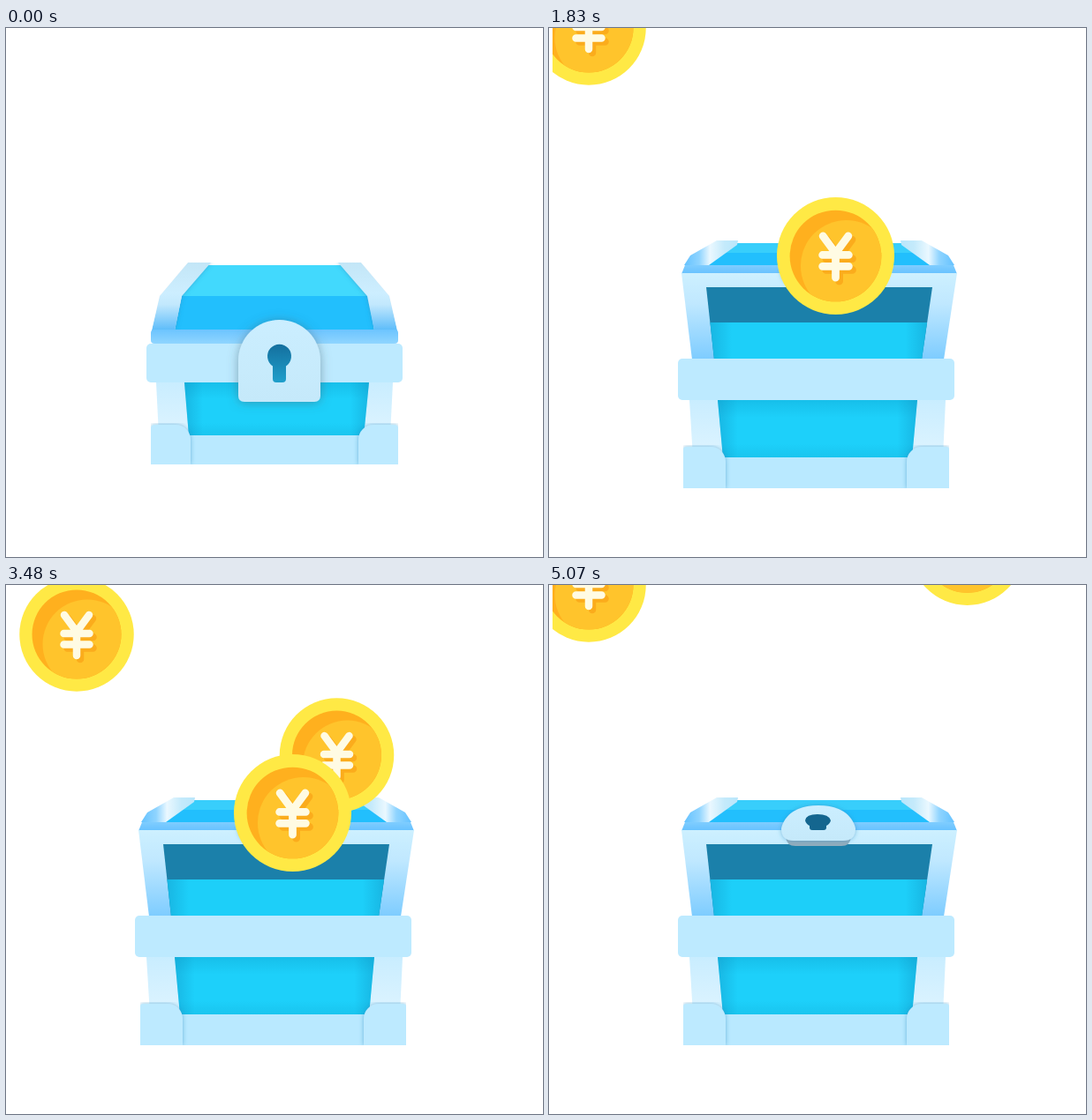
An HTML page for the animation above (5.1 s loop, 608 by 600 pixels).

```html
<!DOCTYPE html>
<html lang="en">
<head>
<meta charset="utf-8">
<title>Treasure chest</title>
<style>
  html, body { margin: 0; width: 100%; height: 100%; overflow: hidden; background: #fff; }
  svg { display: block; width: 608px; height: 600px; }
</style>
</head>
<body>
<svg viewBox="0 0 608 600">
  <defs>
    <linearGradient id="strap" x1="0" y1="0" x2="0" y2="1">
      <stop offset="0" stop-color="#c3e6f7"/>
      <stop offset=".45" stop-color="#cdeeff"/>
      <stop offset=".62" stop-color="#c2e8fd"/>
      <stop offset="1" stop-color="#5cbcfa"/>
    </linearGradient>
    <linearGradient id="rimShut" x1="0" y1="0" x2="0" y2="1">
      <stop offset="0" stop-color="#6cc4ff"/>
      <stop offset="1" stop-color="#8fd5ff"/>
    </linearGradient>
    <linearGradient id="rimOpen" x1="0" y1="0" x2="0" y2="1">
      <stop offset="0" stop-color="#7fcdff"/>
      <stop offset="1" stop-color="#66c1ff"/>
    </linearGradient>
    <linearGradient id="corner">
      <stop offset="0" stop-color="#64c2ff"/>
      <stop offset=".28" stop-color="#8fd4ff"/>
      <stop offset=".48" stop-color="#eaf8ff"/>
      <stop offset=".75" stop-color="#c4eafb"/>
      <stop offset="1" stop-color="#b9e6fb"/>
    </linearGradient>
    <linearGradient id="frame" x1="0" y1="0" x2="0" y2="1">
      <stop offset="0" stop-color="#cdf0ff"/>
      <stop offset=".35" stop-color="#c0e8ff"/>
      <stop offset="1" stop-color="#7dccff"/>
    </linearGradient>
    <linearGradient id="leg" x1="0" y1="0" x2="0" y2="1">
      <stop offset="0" stop-color="#c9edff"/>
      <stop offset="1" stop-color="#def4ff"/>
    </linearGradient>
    <linearGradient id="plate" x1="0" y1="0" x2="0" y2="1">
      <stop offset="0" stop-color="#cbeeff"/>
      <stop offset="1" stop-color="#c5e9fa"/>
    </linearGradient>
    <linearGradient id="hole" x1="0" y1="0" x2="0" y2="1">
      <stop offset="0" stop-color="#146f9e"/>
      <stop offset="1" stop-color="#1f9fcb"/>
    </linearGradient>
    <linearGradient id="body" x1="0" y1="0" x2="0" y2="1">
      <stop offset="0" stop-color="#17bfea"/>
      <stop offset=".3" stop-color="#1dd0fa"/>
      <stop offset=".75" stop-color="#1dd0fa"/>
      <stop offset="1" stop-color="#19c4ee"/>
    </linearGradient>
    <linearGradient id="sides">
      <stop offset="0" stop-color="#1090c0" stop-opacity=".4"/>
      <stop offset=".1" stop-color="#1090c0" stop-opacity="0"/>
      <stop offset=".9" stop-color="#1090c0" stop-opacity="0"/>
      <stop offset="1" stop-color="#1090c0" stop-opacity=".4"/>
    </linearGradient>
    <filter id="soft" x="-30%" y="-30%" width="160%" height="160%">
      <feDropShadow dx="0" dy="1" stdDeviation="6" flood-color="#41606e" flood-opacity=".5"/>
    </filter>
    <filter id="edge" x="-20%" y="-20%" width="140%" height="140%">
      <feDropShadow dx="0" dy="0" stdDeviation="2.500" flood-color="#2a8fc4" flood-opacity=".6"/>
    </filter>
    <clipPath id="face"><circle r="50.5"/></clipPath>
    <clipPath id="stage"><rect x="4" width="600" height="600"/></clipPath>
    <clipPath id="lidShape"><path d="M206 266H402L434 304 443 343H165L174 304Z"/></clipPath>
    <clipPath id="feetShut"><path d="M164 448H444V495H164Z"/></clipPath>
    <clipPath id="feetOpen"><path d="M152 473H453V522H152Z"/></clipPath>
    <path id="yen" d="M-14-22 0-3 14-22M0-3V24M-14.500-1h29M-14.500 11.500h29"
      fill="none" stroke-width="8.500" stroke-linecap="round" stroke-linejoin="round"/>
    <g id="coin">
      <circle r="64.750" fill="#ffe945"/>
      <circle r="50.500" fill="#ffb01e"/>
      <circle cx="12" cy="11" r="50.500" fill="#ffc42c" clip-path="url(#face)"/>
      <use href="#yen" x="4" y="4" stroke="#fbac1c"/>
      <use href="#yen" stroke="#fffbe3"/>
    </g>

    <path id="strapShut" d="M206 266H232L199 304 191 343H165L174 304Z" fill="url(#strap)"/>
    <path id="footShut" d="M164 454q0-4 4-4H192a17 17 0 0 1 17 17V495H164Z" fill="#bdeaff"/>
    <path id="cornerOpen" d="M190 241H214L213 246 181 269H153L160 258Z" fill="url(#corner)"/>
    <path id="footOpen" d="M152 478q0-3 3-3H183a17 17 0 0 1 17 17V522H152Z" fill="#bdeaff"/>
    <path id="bodyShut" d="M202 402H411L405 463H207Z"/>
    <path id="bodyOpen" d="M191 422H417L411 488H197Z"/>
    <path id="inside" d="M182.500 334H428L422 376H187Z"/>
  </defs>

  <g clip-path="url(#stage)">
    <g id="shut">
      <path d="M228 269H380L410 304 417 343H191L199 304Z" fill="#22bffd"/>
      <path d="M228 269H380L410 304H199Z" fill="#42d9fd"/>
      <g clip-path="url(#lidShape)">
        <g filter="url(#edge)">
          <use href="#strapShut"/>
          <use href="#strapShut" transform="matrix(-1 0 0 1 608 0)"/>
        </g>
      </g>
      <rect x="164" y="342" width="280" height="16" rx="4" fill="url(#rimShut)"/>
      <path d="M170 402H438L435 462H173Z" fill="url(#leg)"/>
      <use href="#bodyShut" fill="url(#body)"/>
      <use href="#bodyShut" fill="url(#sides)"/>
      <rect x="166" y="462" width="276" height="33" fill="#b9e9ff"/>
      <g clip-path="url(#feetShut)">
        <g filter="url(#edge)">
          <use href="#footShut"/>
          <use href="#footShut" transform="matrix(-1 0 0 1 608 0)"/>
        </g>
      </g>
      <rect x="159" y="358" width="290" height="44" rx="5" fill="#bdeaff"/>
      <path d="M263 377.500a46.500 46.500 0 0 1 93 0V417q0 7-7 7H270q-7 0-7-7Z" fill="url(#plate)" filter="url(#soft)"/>
      <path d="M302 383.500a13.500 13.500 0 1 1 15 0V398q0 4-4 4h-7q-4 0-4-4Z" fill="url(#hole)"/>
    </g>

    <g id="open">
      <path d="M205 244H408L440 270H172Z" fill="#22bffd"/>
      <path d="M210 244H403L414 255H196Z" fill="#38cefb"/>
      <use href="#cornerOpen"/>
      <use href="#cornerOpen" transform="matrix(-1 0 0 1 612 0)"/>
      <path d="M154 269H458L462 279H150Z" fill="url(#rimOpen)"/>
      <path d="M150 278H462L447 376H162Z" fill="url(#frame)"/>
      <path d="M178 294H434L422 376H187Z" fill="#1b80aa"/>
      <use href="#inside" fill="#1dcff9"/>
      <use href="#inside" fill="url(#sides)"/>
      <path d="M268 286H342Q341 296 331 296H279Q269 296 268 286Z" fill="#93adbd"/>
      <path d="M263 276C267 260 281 250 305 250S343 260 347 276Q347 290 333 290H277Q263 290 263 276Z" fill="url(#plate)" filter="url(#edge)"/>
      <path d="M290 267Q291 260 304 260T319 267Q318 271 314 273V275Q314 278 311 278H298Q295 278 295 275V273Q291 271 290 267Z" fill="#14668f"/>
      <path d="M159 422H449L446 487H163Z" fill="url(#leg)"/>
      <use href="#bodyOpen" fill="url(#body)"/>
      <use href="#bodyOpen" fill="url(#sides)"/>
      <rect x="154" y="487" width="297" height="35" fill="#b9e9ff"/>
      <g clip-path="url(#feetOpen)">
        <g filter="url(#edge)">
          <use href="#footOpen"/>
          <use href="#footOpen" transform="matrix(-1 0 0 1 605 0)"/>
        </g>
      </g>
      <rect x="146" y="375" width="313" height="47" rx="5" fill="#bdeaff"/>
    </g>
    <g id="coins"></g>
  </g>
</svg>
<script>
const LOOP = 5100, STEP = 30;
const SHRINK_END = 18, OPEN_AT = 21;
const shut = document.getElementById('shut');
const open = document.getElementById('open');
const layer = document.getElementById('coins');

// Places along the curved flight to the left, one per step
const leftPath = [[319, 300], [279, 273], [236, 242], [192, 207],
  [151, 163], [115, 111], [80, 56], [45, 0]];

// Each flight lists its launch steps and its pose k steps after a launch
const flights = [
  {
    life: 7,
    starts: [23, 33, 43, 53, 63, 74, 84, 94, 104, 114, 123, 132, 142, 153, 163],
    pose: k => ({ x: 325 + 24.75 * k, y: 310.5 - 58.7 * k, size: 1, turn: 0 })
  },
  {
    life: 8,
    starts: [28, 38, 46, 54, 64, 74, 84, 93, 102, 110, 119, 128, 138, 146, 154, 162],
    pose: k => ({ x: leftPath[k][0], y: leftPath[k][1], size: k ? 1 : 1.027, turn: 0 })
  },
  {
    life: 6,
    starts: [24, 34, 44, 53, 61, 71, 81, 91, 100, 108, 116, 125, 138, 147, 156],
    pose: k => ({ x: 324.5 - 28.9 * k, y: 258.5 - 58.2 * k, size: 1.027, turn: -11 * k })
  }
];

for (const flight of flights) {
  flight.coin = document.createElementNS('http://www.w3.org/2000/svg', 'use');
  flight.coin.setAttribute('href', '#coin');
  layer.append(flight.coin);
}

function show(node, on) {
  node.setAttribute('visibility', on ? 'visible' : 'hidden');
}

function drawChest(step) {
  const isOpen = step >= OPEN_AT;
  show(shut, !isOpen);
  show(open, isOpen);
  const grow = Math.max(0, (step - SHRINK_END) / (OPEN_AT - SHRINK_END));
  const small = 1 - 0.08 * Math.min(1, step / SHRINK_END);
  const scale = small + (1.077 - small) * grow;
  shut.setAttribute('transform',
    `translate(304 ${380 + 18 * grow}) scale(${scale}) translate(-304 -380)`);
}

function drawCoin({ coin, starts, life, pose }, step) {
  const start = starts.find(s => step >= s && step < s + life);
  show(coin, start !== undefined);
  if (start === undefined) return;
  const { x, y, size, turn } = pose(step - start);
  coin.setAttribute('transform', `translate(${x} ${y}) rotate(${turn}) scale(${size})`);
}

const begin = performance.now();
function draw() {
  const step = Math.floor(((performance.now() - begin) % LOOP) / STEP);
  drawChest(step);
  flights.forEach(flight => drawCoin(flight, step));
  requestAnimationFrame(draw);
}
draw();
</script>
</body>
</html>
```
